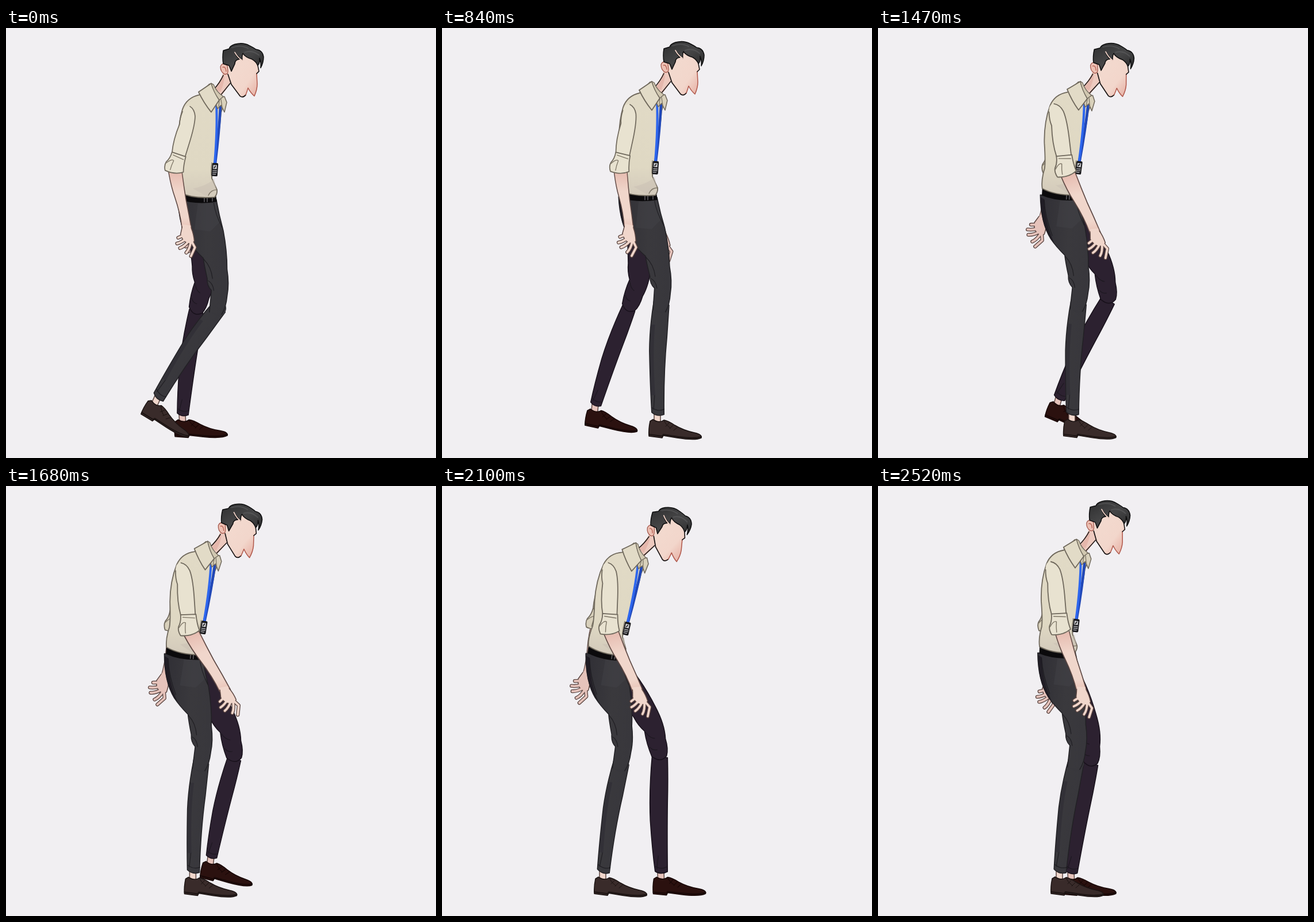
An HTML page that plays this animation: 748 by 748 pixels, repeating every 2.73 s.

```html
<!DOCTYPE html>
<html lang="en">
<head>
<meta charset="utf-8">
<title>Slouching walk</title>
<style>
  html, body { margin: 0; width: 100%; height: 100%; overflow: hidden; background: #f1eff2; }
  svg { display: block; width: 100%; height: 100%; }
  path { stroke-linejoin: round; stroke-linecap: round; }
  .near { --shirt: #e8e2d0; --skin: #f0d6cb; --shoe: #392b2a; --edge: #1b1312; --pants: url(#gPants); --hem: #222125; }
  .far { --shirt: #d8d0bb; --skin: #e6c3bb; --shoe: #2b110f; --edge: #170706; --pants: #2c2130; --hem: #17101a; }
  .cloth { fill: var(--shirt); stroke: #6f685c; stroke-width: 1.7; }
  .skin { fill: var(--skin); stroke: #5b4642; stroke-width: 1.5; }
  .pants { fill: var(--pants); stroke: var(--hem); stroke-width: 1.5; }
  .shoe { fill: var(--shoe); stroke: var(--edge); stroke-width: 1.5; }
  .line { fill: none; stroke: #7d7566; stroke-width: 1.3; }
  .dark { fill: none; stroke: #17161a; stroke-width: 1.2; opacity: .7; }
</style>
</head>
<body>
<svg viewBox="0 0 748 748">
  <defs>
    <linearGradient id="gPants" gradientUnits="userSpaceOnUse" x1="310" y1="0" x2="390" y2="0">
      <stop offset="0" stop-color="#313036"/><stop offset=".55" stop-color="#3a393d"/><stop offset="1" stop-color="#38373c"/>
    </linearGradient>
    <linearGradient id="gShirt" x1="0" y1="0" x2="0" y2="1">
      <stop offset="0" stop-color="#e1dac6"/><stop offset=".75" stop-color="#dfd8c3"/><stop offset="1" stop-color="#d3cabb"/>
    </linearGradient>
    <linearGradient id="gHair" x1="0" y1="0" x2="1" y2="1">
      <stop offset="0" stop-color="#2d2d2e"/><stop offset=".5" stop-color="#464647"/><stop offset="1" stop-color="#29292a"/>
    </linearGradient>
    <linearGradient id="gFace" x1="0" y1="0" x2="1" y2="1">
      <stop offset="0" stop-color="#f3dbd0"/><stop offset=".65" stop-color="#f2d6cb"/><stop offset="1" stop-color="#e5aa9e"/>
    </linearGradient>
    <linearGradient id="gBlush" x1="0" y1="0" x2="0" y2="1">
      <stop offset="0" stop-color="#d9998c" stop-opacity=".45"/><stop offset=".35" stop-color="#d9998c" stop-opacity="0"/>
      <stop offset=".8" stop-color="#d9998c" stop-opacity="0"/><stop offset="1" stop-color="#d9998c" stop-opacity=".35"/>
    </linearGradient>

    <g id="sleeve">
      <path d="M306 150Q309 137 316 136Q327 136 329 153Q329 170 318 205L311 228L289 218Q291 195 302 168Z" style="fill:var(--shirt)"/>
      <path class="line" style="stroke:#6f685c;stroke-width:1.7" d="M320 137Q328 142 329 154Q329 170 318 205L311 228M307 146Q302 158 302 168Q291 195 289 218"/>
      <path class="cloth" d="M289 217L313 225Q309 240 309 252Q294 257 277 249Q275 240 279 234Q286 228 289 217Z"/>
      <path class="line" d="M279 236Q289 228 292 232Q288 240 286 248M291 222L309 230"/>
    </g>
    <g id="forearm">
      <path class="skin" d="M283 249Q287 275 294 295Q303 322 306 348L322 350Q318 325 313 300Q309 275 306 251"/>
      <path fill="url(#gBlush)" d="M284 250Q287 275 294 295Q303 322 306 348L322 350Q318 325 313 300Q309 275 306 252Z"/>
    </g>
    <path id="fingers" fill="none" d="M310 359L299 364M313 365Q305 372 297 374M317 370Q310 379 302 382M321 368L328 381L321 396M321 370Q319 384 313 390"/>
    <g id="hand">
      <use href="#fingers" stroke="#5b4642" stroke-width="6.4"/>
      <path class="skin" d="M306 345L303 358Q306 369 314 373Q322 376 327 370Q326 358 322 348"/>
      <use href="#fingers" style="stroke:var(--skin)" stroke-width="3.8"/>
      <path d="M307 341L306 352L320 354L321 343Z" style="fill:var(--skin)"/>
    </g>
    <g id="foot">
      <path class="skin" d="M-6-4V15H5V-4"/>
      <path class="shoe" d="M-13 12Q-16 26-15 38L8 41L10 37L34 41Q66 46 76 41Q78 35 64 32Q45 28 30 19Q18 11 11 10Q3 16-8 9Z"/>
      <path d="M-15 35L8 38L10 35L36 39Q64 43 76 39" fill="none" style="stroke:var(--edge)" stroke-width="2"/>
      <path d="M11 11Q14 18 22 24M20 15L14 21M27 19L21 25M34 23L28 28" fill="none" style="stroke:var(--edge)" stroke-width="1"/>
    </g>
  </defs>

  <g class="far">
    <use id="fForearm" href="#forearm"/><use id="fHand" href="#hand"/><use id="fSleeve" href="#sleeve"/>
    <use id="fFoot" href="#foot"/>
    <g id="fShin">
      <path class="pants" d="M389 470Q382 530 383 580Q385 630 389 666Q399 673 410 667Q411 600 413 550Q415 510 415 474Z"/>
      <path class="dark" d="M390 658Q400 664 409 659M395 640L392 662"/>
    </g>
    <g id="fThigh">
      <path class="pants" d="M330 300Q365 335 392 385Q409 415 411 440Q417 458 414 470Q404 484 388 472Q378 450 374 428Q362 418 355 405L300 330Z"/>
      <path class="dark" d="M376 430Q384 440 392 440M384 456Q390 462 397 460"/>
    </g>
  </g>

  <g class="near">
    <use id="nFoot" href="#foot"/>
    <g id="nShin">
      <path class="pants" d="M363 480Q357 525 358 565Q361 625 365 669Q375 677 386 672Q383 600 387 540Q388 510 389 486"/>
      <circle cx="376" cy="487" r="13" fill="#38373c"/>
      <path class="dark" d="M365 661Q376 668 386 663M369 640L368 664"/>
      <path d="M360 520Q357 560 363 640L370 640Q363 570 366 520Z" fill="#2c2b33" opacity=".55"/>
    </g>
    <g id="nThigh">
      <path class="pants" d="M364 489L366 452Q358 445 358 432Q352 410 350 398Q335 385 325 372Q306 345 303 298L368 298Q374 325 382 350Q390 385 391 415Q396 440 393 460Q392 480 385 492"/>
      <path d="M304 302Q305 345 325 372L331 378Q313 345 310 305Z" fill="#1b171f" opacity=".75"/>
      <path d="M337 305L368 304L376 335L360 352L333 350Z" fill="#45444a" opacity=".4"/>
      <path class="dark" d="M310 306Q313 335 327 366M351 400Q364 412 367 432M360 436Q368 440 370 452M364 304Q367 322 380 345"/>
    </g>
  </g>

  <g id="body" class="near">
    <path d="M302 286Q325 296 365 291L367 303Q330 309 302 299Z" fill="#0b0a0c"/>
    <path d="M345 295V303M350 295V303M359 293V302" stroke="#77747a" stroke-width="1.2"/>
    <path d="M354 98L336 117Q314 122 307 142Q298 172 301 208Q305 240 304 252Q299 272 302 287Q325 298 363 295Q368 289 367 282L358 262Q360 240 364 226Q371 185 374 148L381 124Z" fill="url(#gShirt)" stroke="#6f685c" stroke-width="1.8"/>
    <path d="M325 280Q350 275 362 263L366 283L348 293Z" fill="#c9bfb4" opacity=".5"/>
    <path class="line" d="M367 282Q356 282 352 292M358 262Q356 250 358 235"/>
    <path d="M377 80Q373 93 360 109L372 122Q385 106 390 97L388 74Z" fill="#edcabf"/>
    <path d="M380 83Q372 96 364 108L373 112Q380 96 380 83Z" fill="#dc9f94" opacity=".45"/>
    <path d="M378 83Q372 96 361 108M390 97Q382 107 373 118" fill="none" stroke="#211918" stroke-width="1.6"/>
    <path d="M373 136Q371 180 364 236" fill="none" stroke="#2148b8" stroke-width="4.5"/>
    <path d="M366 132Q368 175 363 236" fill="none" stroke="#2d66ee" stroke-width="4"/>
    <path d="M369 122L380 120L384 130L380 147L374 135L368 141L364 130Z" fill="#d9d1bb" stroke="#6f685c" stroke-width="1.5"/>
    <path d="M374 125L376 139M371 127L370 137" class="line"/>
    <path d="M357 97Q344 106 335 112Q344 131 357 147L371 126Q362 112 357 97Z" fill="#e2dbc7" stroke="#6f685c" stroke-width="1.8"/>
    <path d="M357 97L361 99Q366 112 378 120L371 126Q361 112 357 97Z" fill="#d1c8b1" stroke="#6f685c" stroke-width="1.3"/>
    <g transform="rotate(4 363 247)">
      <rect x="358" y="235.500" width="10.500" height="23" rx="2" fill="#17171a"/>
      <rect x="360" y="239" width="6.500" height="7" fill="#c9c9cc"/>
      <path d="M360 249H366.500M360 252H366.500M360 255H365" stroke="#b2b2b6" stroke-width="1.4"/>
      <path d="M362 244L364 241" stroke="#333" stroke-width="2"/>
    </g>
    <path d="M386 58L386 82L392 99L407 119Q412 123 417 117L421 105Q426 114 432 119Q437 108 437 98L436 80L440 76L438 68L428 48L402 44Z" fill="url(#gFace)"/>
    <path d="M386 81L392 99L407 119Q412 123 417 117" fill="none" stroke="#181313" stroke-width="1.7"/>
    <path d="M417 117Q419 112 421 105Q426 114 432 119Q437 108 437 98L436 80" fill="none" stroke="#b0574a" stroke-width="1.5"/>
    <path d="M436 80L440 76L438 66" fill="none" stroke="#181313" stroke-width="1.6"/>
    <path d="M385 66Q376 59 373 68Q373 77 380 81Q386 82 386 76Z" fill="#edc0b3" stroke="#a4584d" stroke-width="1.3"/>
    <path d="M377 69Q382 67 383 76" fill="none" stroke="#b0574a" stroke-width="1.2"/>
    <path d="M378 40L388 37Q389 32 398 29Q412 25 423 31Q431 35 435 38Q446 39 448 51Q448 61 443 70Q444 60 441 53Q442 62 438 66Q435 59 428 55Q417 52 412 45Q410 50 411 57Q404 50 398 44Q402 52 406 55Q398 56 398 63L392 76L388 66L378 63Q376 52 378 40Z" fill="url(#gHair)" stroke="#0c0c0d" stroke-width="1.5"/>
    <path d="M398 43Q403 52 411 57" fill="none" stroke="#f0d2c7" stroke-width="1.8"/>
    <path d="M393 35Q408 29 421 36M415 43Q428 38 440 48" fill="none" stroke="#646466" stroke-width="2" opacity=".5"/>
  </g>

  <g class="near">
    <use id="nForearm" href="#forearm"/><use id="nHand" href="#hand"/><use id="nSleeve" href="#sleeve"/>
  </g>
</svg>
<script>
const STEP = 210, COUNT = 13;

// Looping value, moving evenly between a few { step: value } key points
function keys(points) {
  const steps = Object.keys(points).map(Number).sort((a, b) => a - b);
  const first = steps[0], last = steps[steps.length - 1];
  return step => {
    if (step < first) step += COUNT;
    const from = steps.filter(s => s <= step).pop();
    const to = from === last ? first : steps.find(s => s > from);
    const length = (to - from + COUNT) % COUNT;
    return points[from] + (points[to] - points[from]) * (step - from) / length;
  };
}

// Limb angles are in degrees from straight down, positive to the right
const body = {
  x: keys({ 0: 363, 5: 373, 7: 349, 9: 338, 10: 321, 12: 344 }),
  y: keys({ 1: 250, 3: 240, 5: 246, 7: 243, 9: 249, 10: 248, 11: 239 }),
  lean: keys({ 0: 0, 5: 0, 10: 8.5 })
};
const near = {
  thigh: keys({ 3: 13, 9.5: 8 }),
  footX: keys({ 0: 264, 2: 361, 4: 375, 9: 313, 10: 280, 12: 316 }),
  footY: keys({ 0: 643, 1: 668, 2: 655, 4: 672, 12: 671 }),
  tilt: keys({ 0: 24, 1: 3, 2: 0, 12: 0 }),
  upper: keys({ 0: -17, 2: -24, 4: -12, 7: 7, 10: -2, 12: 5 }),
  lower: keys({ 0: 13, 2: 9, 4: 10, 8: 32, 12: 20 })
};
const far = {
  thigh: keys({ 0: 0, 4: -4, 7: 26, 10: 29, 12: 18 }),
  footX: keys({ 0: 307, 2: 293, 4: 267, 6: 273, 9: 399, 10: 381, 12: 336 }),
  footY: keys({ 0: 672, 2: 667, 6: 642, 8: 645, 9: 667, 10: 671 }),
  tilt: keys({ 0: -3, 2: -3, 4: 5, 6: 24, 9: -2 }),
  upper: keys({ 3: 12, 9: -15, 10: -16 }),
  lower: keys({ 2: 20, 4: 20, 7: -11, 10: -10 })
};

// Joints at which each part is drawn
const rest = {
  nThigh: [[334, 298], [377, 484]], nShin: [[375, 490], [375, 672]],
  fThigh: [[299, 296], [402, 470]], fShin: [[402, 470], [399, 667]],
  Sleeve: [[322, 150], [292, 250]], Forearm: [[292, 250], [314, 347]]
};

const RAD = Math.PI / 180;
const put = (id, value) => document.getElementById(id).setAttribute('transform', value);
const turn = (a, b) => Math.atan2(b[1] - a[1], b[0] - a[0]) / RAD;
const size = (a, b) => Math.hypot(b[0] - a[0], b[1] - a[1]);
const reach = ([x, y], angle, length) => [x + length * Math.sin(angle * RAD), y + length * Math.cos(angle * RAD)];

// Lays a part drawn between two rest joints onto joints a and b
function span(id, a, b, [p, q]) {
  const angle = turn(a, b) - turn(p, q), scale = size(a, b) / size(p, q);
  put(id, `translate(${a}) rotate(${angle}) scale(${scale}) translate(${-p[0]} ${-p[1]})`);
  return angle;
}

function drawSide(key, limb, i, hip, shoulder) {
  const thigh = limb.thigh(i), upper = limb.upper(i), lower = limb.lower(i);
  const knee = reach(hip, thigh, 193 + thigh * .25);
  const foot = [limb.footX(i), limb.footY(i)];
  // Arms look shorter as they swing back
  const elbow = reach(shoulder, upper, 109 + upper * .3);
  const wrist = reach(elbow, lower, 92 + lower * .75);
  span(key + 'Thigh', hip, knee, rest[key + 'Thigh']);
  span(key + 'Shin', knee, foot, rest[key + 'Shin']);
  put(key + 'Foot', `translate(${foot}) rotate(${limb.tilt(i)})`);
  span(key + 'Sleeve', shoulder, elbow, rest.Sleeve);
  const angle = span(key + 'Forearm', elbow, wrist, rest.Forearm);
  put(key + 'Hand', `translate(${wrist}) rotate(${angle}) translate(-314 -347)`);
}

function draw(i) {
  const badge = [body.x(i), body.y(i)], lean = body.lean(i);
  const c = Math.cos(lean * RAD), s = Math.sin(lean * RAD);
  const onBody = (x, y) => [badge[0] + x * c - y * s, badge[1] + x * s + y * c];
  const hip = onBody(-32, 51), shoulder = onBody(-41, -97);
  put('body', `translate(${badge}) rotate(${lean}) translate(-363 -247)`);
  drawSide('n', near, i, hip, shoulder);
  drawSide('f', far, i, hip, shoulder);
}

let shown = 0;
draw(0);
const start = performance.now();
function tick() {
  const i = Math.floor((performance.now() - start) / STEP) % COUNT;
  if (i !== shown) draw(shown = i);
  requestAnimationFrame(tick);
}
requestAnimationFrame(tick);
</script>
</body>
</html>
```
